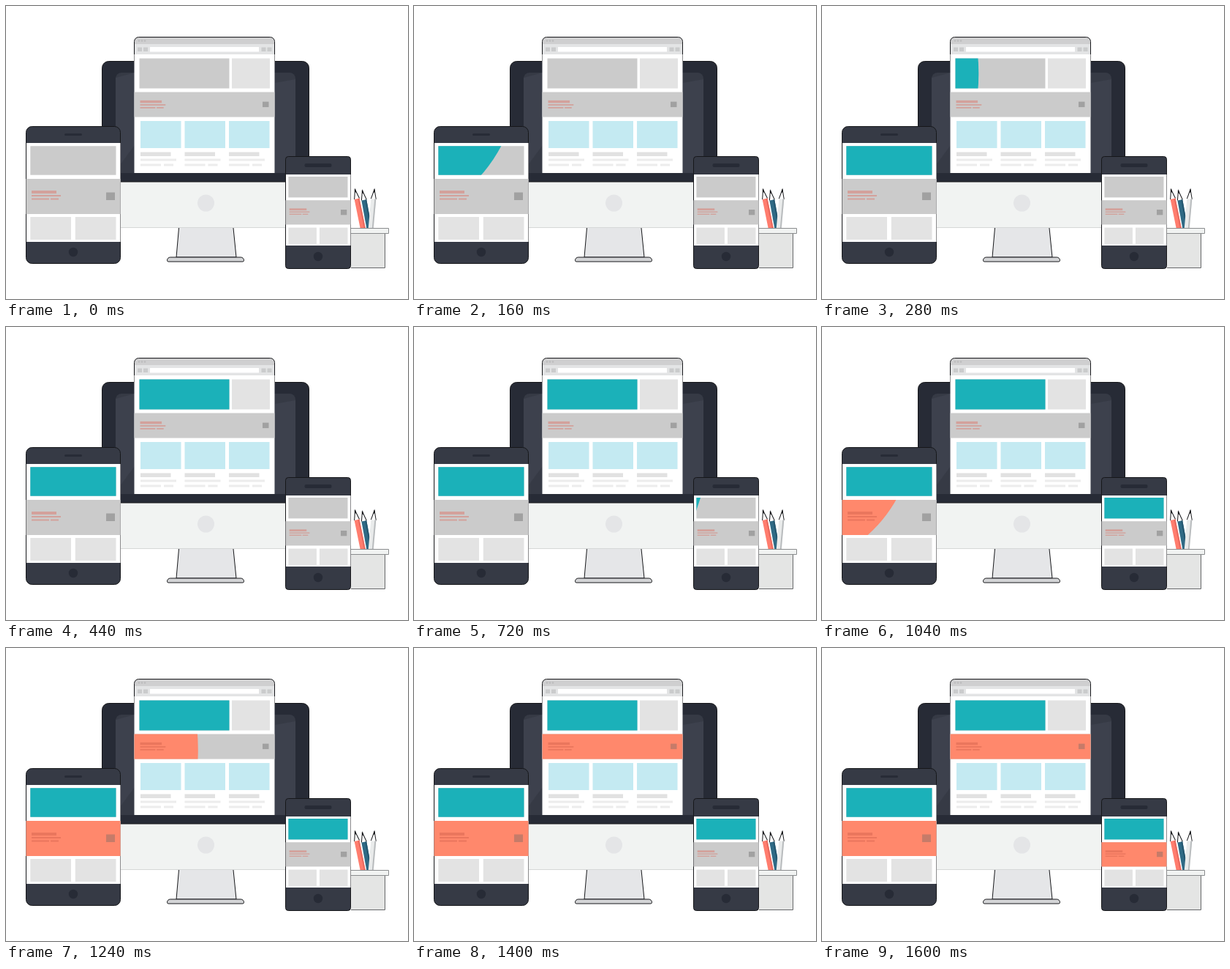
Animation of 550x400 px, one loop 1.92 s. Source, as an HTML page with a canvas:

```html
<!DOCTYPE html>
<html lang="en">
<head>
<meta charset="utf-8">
<title>Responsive wireframes</title>
<style>
html, body { margin: 0; width: 100%; height: 100%; overflow: hidden; background: #fff; }
canvas { display: block; }
</style>
</head>
<body>
<canvas id="stage" width="550" height="400"></canvas>
<script>
const ctx = document.getElementById('stage').getContext('2d');
const LOOP = 1920, STEP = 40;
const DARK = '#363a45', DEEP = '#272b36', INK = '#16171a', PALE = '#e3e3e3', TEAL = '#1bb1b9';
const GREY = { panel: '#cbcbcb', text: '#d3a19b', icon: '#a1a1a1' };
const CORAL = { panel: '#ff886c', text: '#ea765d', icon: '#c67b69' };

const tablet = { x: 27, y: 164, w: 130, h: 188, top: 187, page: 135, speaker: 24 };
const phone = { x: 382, y: 205, w: 90, h: 154, top: 230, page: 97, speaker: 37 };
const browser = { x: 175.5, y: 42.5, w: 192, h: 185.5 };

function rect(color, x, y, w, h) {
  ctx.fillStyle = color;
  ctx.fillRect(x, y, w, h);
}

function paint(color, line) {
  ctx.fillStyle = color;
  ctx.fill();
  ctx.strokeStyle = line;
  if (line) ctx.stroke();
}

function round(color, x, y, w, h, r, line) {
  ctx.beginPath();
  ctx.roundRect(x, y, w, h, r);
  paint(color, line);
}

// The last side stays without a line.
function poly(color, points, line) {
  ctx.beginPath();
  points.forEach(p => ctx.lineTo(...p));
  paint(color, line);
}

function disc(color, x, y, r) {
  ctx.beginPath();
  ctx.arc(x, y, r, 0, 7);
  paint(color);
}

function drawMonitor() {
  round('#f1f3f2', 131.5, 220, 283, 82.5, 4, '#d5d7d7');
  round(DEEP, 131.5, 75.5, 283, 164.5, [9, 9, 0, 0], INK);
  round(DARK, 150, 91, 246, 137, [8, 8, 0, 0]);
  poly('#3d414d', [[368, 105], [396, 100], [396, 228], [368, 228]]);
  poly('#3d414d', [[150, 98], [176, 91], [176, 190], [150, 225]]);
  disc('#e4e5e7', 273.5, 269, 11.5);
  poly('#e5e6e8', [[236.5, 303], [233, 343], [315, 343], [311, 303]], INK);
  round('#d3d4d6', 220.5, 343, 105, 6, [5, 5, 2, 2], INK);
}

function drawBrowser() {
  const { x, y, w, h } = browser;
  round('#cfcfd0', x, y, w, 40, 6, INK);
  rect('#e3e4e5', x + 0.5, 52, w - 1, 14);
  rect('#fff', x, 66, w, y + h - 66);
  rect('#fff', 197, 56, 149, 6.5);
  for (let i = 0; i < 3; i++) disc('#bcbcbd', 182 + i * 4, 47.5, 1.3);
  for (let i = 0; i < 2; i++) {
    rect('#cacbcc', 180 + i * 8, 56.5, 6, 5.5);
    rect('#cacbcc', 349.5 + i * 8, 56.5, 6, 5.5);
  }
  rect(PALE, 309, 71.5, 52, 41);
  for (let i = 0; i < 3; i++) {
    const left = 184 + i * 60.5;
    rect('#c4eaf2', left, 157, 55.5, 37);
    rect('#e1e1e1', left, 199.5, 41.5, 5.5);
    rect('#ececec', left, 208.5, 49, 3);
    rect('#ececec', left, 215.5, 28, 3);
    rect('#ececec', left + 32, 215.5, 13, 3);
  }
}

function drawHandheld({ x, y, w, h, top, page, speaker }) {
  const s = w / 130, v = page / 135, middle = x + w / 2, bottom = top + page;
  round(DARK, x + 0.5, y + 0.5, w - 1, h - 1, 8 * s * s, INK);
  rect('#fff', x + 1, top, w - 1.5, page);
  round(DEEP, middle - speaker / 2, (y + top) / 2 - speaker / 15, speaker, speaker / 7.5, 2);
  disc(DEEP, middle, (bottom + y + h) / 2 - 1, 6.2);
  for (let i = 0; i < 2; i++) rect(PALE, x + (6.3 + i * 61.5) * s, top + 101 * v, 55.7 * s, 31 * v);
}

function drawPencil(color, shade, x, y, lean) {
  ctx.save();
  ctx.translate(x, y);
  ctx.rotate(lean);
  poly('#fff', [[-3.5, 13], [0, 0], [3.5, 13]], INK);
  rect(INK, -0.8, 0, 1.6, 4);
  rect(color, -3.5, 13, 7, 45);
  rect(shade, 1.5, 13, 2, 45);
  ctx.restore();
}

function drawCup() {
  drawPencil('#ff7d6e', '#e96a5f', 477.5, 250.5, -0.2);
  drawPencil('#2f6a85', '#24566f', 487.5, 252, -0.18);
  drawPencil('#e9ebeb', '#b9bcbe', 504, 250.5, 0.09);
  poly('#e4e5e4', [[472, 310], [518.5, 310], [518.5, 357.5], [472, 357.5]], '#66686a');
  poly('#f1f3f2', [[472, 303.5], [523.5, 303.5], [523.5, 310.5], [472, 310.5]], '#8a8c8e');
}

function drawHeroes(color) {
  rect(color, 182.5, 71.5, 123, 41);
  for (const { x, w, top, page } of [tablet, phone]) {
    const s = w / 130, v = page / 135;
    rect(color, x + 6.3 * s, top + 4.2 * v, 117.2 * s, 39.5 * v);
  }
}

function drawBand(theme, x, y, w, s, pad, textScale) {
  rect(theme.panel, x, y, w, 48 * s);
  rect(theme.icon, x + w - pad - 12 * s, y + 18.5 * s, 12 * s, 10.5 * s);
  const bar = (dx, dy, length, height) =>
    rect(theme.text, x + pad + dx * textScale, y + 16 * s + dy * textScale, length * textScale, height * textScale);
  bar(0, 0, 34, 4);
  bar(0, 6, 40, 2);
  bar(0, 10.5, 24, 2);
  bar(26, 10.5, 11, 2);
}

function drawBands(theme) {
  drawBand(theme, browser.x, 117.5, browser.w, 0.71, 8, 0.87);
  for (const { x, w, top, page } of [tablet, phone]) {
    const s = w / 130;
    drawBand(theme, x + 0.5, top + 49 * page / 135, w - 1, s, 7.5 * s, s);
  }
}

function insideCircle(x, y, radius, draw) {
  ctx.save();
  ctx.beginPath();
  ctx.arc(x, y, Math.max(0, radius), 0, 7);
  ctx.clip();
  draw();
  ctx.restore();
}

function render(now) {
  const t = Math.floor(now % LOOP / STEP) * STEP;
  rect('#fff', 0, 0, 550, 400);
  drawMonitor();
  drawBrowser();
  drawHandheld(tablet);
  drawCup();
  drawHandheld(phone);
  drawHeroes(GREY.panel);
  drawBands(GREY);

  // The teal wave rests for a moment between the monitor and the phone.
  const tealTime = t > 440 ? Math.max(440, t - 100) : t;
  insideCircle(-67, 92, 117.5 + 0.585 * tealTime, () => drawHeroes(TEAL));
  insideCircle(-67, 140, 0.68 * (t - 755), () => drawBands(CORAL));
}

const start = performance.now();
function tick() {
  render(performance.now() - start);
  requestAnimationFrame(tick);
}
tick();
</script>
</body>
</html>
```
